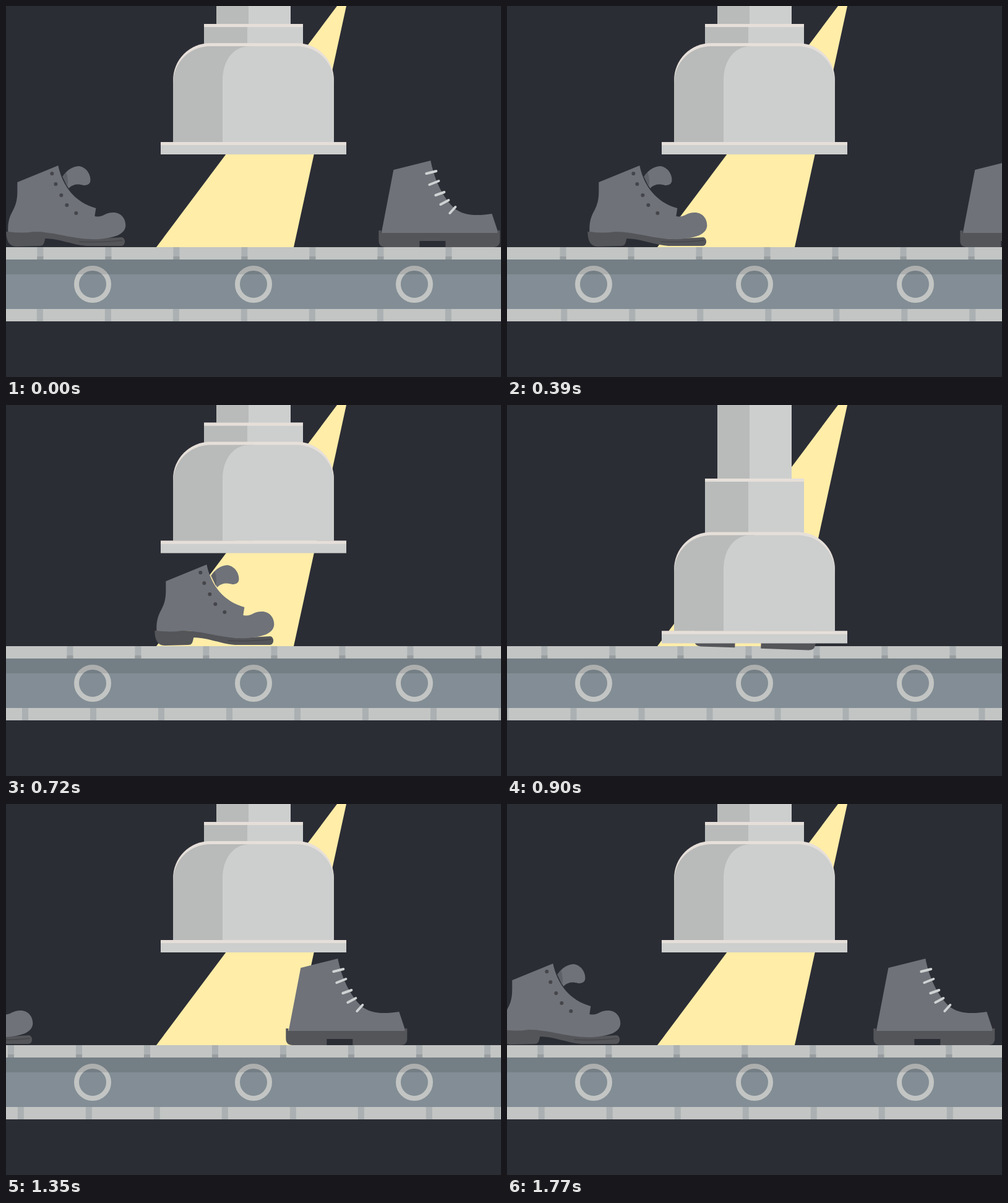
Recreate the animation shown at these times as an HTML page. Size 800 px wide and 600 px high, loop 1800 ms.

```html
<!DOCTYPE html>
<html lang="en">
<head>
<meta charset="utf-8">
<title>Shoe press</title>
<style>
  html, body { margin: 0; width: 100%; height: 100%; overflow: hidden; background: #2b2d35; }
  svg { display: block; width: 100%; height: 100%; }
  .upper { fill: #6f7279; }
  .sole { fill: #545559; }
  .light { fill: #cdcfce; }
  .dim { fill: #b9bbba; }
  .rim { fill: #e6dfd9; }
  .belt { fill: #c2c5c3; }
  .notch { fill: #abb0b2; }
</style>
</head>
<body>
<svg viewBox="0 0 800 600">
  <rect width="800" height="600" fill="#2b2d35"/>
  <path d="M535 0H550L465 390H243Z" fill="#ffeda8"/>

  <rect y="410" width="800" height="80" fill="#828d95"/>
  <g id="rollers" fill="none" stroke="#c2c5c3" stroke-width="8"></g>
  <rect y="410" width="800" height="24" fill="#000" opacity=".11"/>
  <rect class="belt" y="390" width="800" height="20"/>
  <g id="topNotches"></g>
  <rect class="belt" y="490" width="800" height="20"/>
  <g id="bottomNotches"></g>

  <g id="shoes">
    <g id="wornShoe">
      <path class="upper" d="M91 276C99 264 109 259 118 259C130 261 137 273 136 283C135 289 130 290 125 290C117 288 109 287 101 295Z"/>
      <path d="M91 276L97 269Q101 280 99 293Z" fill="#5f6168"/>
      <path class="sole" d="M0 365H50C80 365 105 374 135 377L187 374C194 376 193 388 186 388L130 388C105 386 90 377 63 376C61 384 61 388 54 388L16 389C5 389 0 380 0 365Z"/>
      <path d="M118 381Q150 383 188 379" fill="none" stroke="#48494d" stroke-width="2"/>
      <path class="upper" d="M18 285L84 258C91 292 112 318 145 327L143 340C157 343 158 334 173 334C186 334 193 344 193 355C192 370 174 375 150 377C110 379 80 365 45 365Q25 368 3 365C2 330 18 334 18 300Z"/>
      <g id="eyelets" fill="#45464b"></g>
    </g>
    <g id="newShoe">
      <path class="upper" d="M626 265L686 250C692 282 706 309 723 326C740 341 764 339 785 336L796 369H606Z"/>
      <path class="sole" d="M602 363H606V367H794V363H798V379Q798 390 787 390H710V380H668V390H613Q602 390 602 379Z"/>
      <path d="M679 271L695 267M684 289L699 283M694 306L708 301M702 321L715 314M717 335L726 325" stroke="#cfd2d2" stroke-width="4" stroke-linecap="round"/>
    </g>
    <circle id="shine" cx="692" cy="285" fill="none" stroke="#e6e6e6"/>
  </g>

  <g id="piston">
    <rect class="dim" x="340" y="-200" width="52" height="230"/>
    <rect class="light" x="392" y="-200" width="68" height="230"/>
    <rect class="dim" x="320" y="29" width="70" height="100"/>
    <rect class="light" x="390" y="29" width="90" height="100"/>
    <rect class="rim" x="320" y="29" width="160" height="5"/>
  </g>
  <g id="head">
    <path class="rim" d="M270 120A60 60 0 0 1 330 60H470A60 60 0 0 1 530 120V220H270Z"/>
    <path class="dim" d="M270 125A60 60 0 0 1 330 65H400V220H270Z"/>
    <path class="light" d="M350 220V120C350 90 366 65 394 65H470A60 60 0 0 1 530 125V220Z"/>
    <rect class="light" x="250" y="220" width="300" height="20"/>
    <rect class="rim" x="250" y="220" width="300" height="5"/>
  </g>
</svg>
<script>
const LOOP = 1800, SWAP = 885, PITCH = 110;
const SHOE_SPEED = 1 / 3, TOP_SPEED = 0.3723, BOTTOM_SPEED = -0.1859;
const $ = id => document.getElementById(id);

const easeIn = k => k * k;
const easeOut = k => 1 - (1 - k) ** 2;
const easeBoth = k => (1 - Math.cos(Math.PI * k)) / 2;
const move = (id, x, y) => $(id).setAttribute('transform', `translate(${x} ${y})`);

// Each key is [time, value, easing towards it].
function track(keys, t) {
  if (t <= keys[0][0]) return keys[0][1];
  for (let i = 1; i < keys.length; i++) {
    const [t0, v0] = keys[i - 1], [t1, v1, ease] = keys[i];
    if (t < t1) return v0 + (v1 - v0) * ease((t - t0) / (t1 - t0));
  }
  return keys[keys.length - 1][1];
}

const pressKeys = depth => [[720, 0], [810, -20, easeOut], [900, depth, easeIn], [1080, 0, easeBoth]];
const pistonKeys = pressKeys(90);
const headKeys = pressKeys(145.5);
const tiltKeys = [[900, 2], [1080, -8, easeBoth], [1200, 0, easeBoth]];

const circles = (points, r) => points.map(([x, y]) => `<circle cx="${x}" cy="${y}" r="${r}"/>`).join('');
$('rollers').innerHTML = circles([[140, 450], [400, 450], [660, 450]], 26);
$('eyelets').innerHTML = circles([[74, 271], [80, 288], [89, 306], [98, 322], [113, 335]], 3);

function notches(y, shaded) {
  let out = '';
  for (let x = 50 - PITCH; x < 800; x += PITCH) {
    out += `<rect class="notch" x="${x}" y="${y}" width="10" height="20"/>`;
    if (shaded) out += `<rect x="${x}" y="${y + 15}" width="10" height="5" fill="#989da0"/>`;
  }
  return out;
}
$('topNotches').innerHTML = notches(390, true);
$('bottomNotches').innerHTML = notches(490, false);

const wrap = x => ((x % PITCH) + PITCH) % PITCH;

function draw(t) {
  move('topNotches', wrap(t * TOP_SPEED), 0);
  move('bottomNotches', wrap(t * BOTTOM_SPEED), 0);
  move('shoes', t * SHOE_SPEED - (t < SWAP ? 0 : 600), 0);
  move('piston', 0, track(pistonKeys, t));
  move('head', 0, track(headKeys, t));

  const tilt = t < SWAP ? 0 : track(tiltKeys, t);
  $('newShoe').setAttribute('transform', `rotate(${tilt} 602 390)`);

  const k = (t - 1620) / 150, visible = k > 0 && k < 1;
  const shine = $('shine');
  shine.setAttribute('visibility', visible ? 'visible' : 'hidden');
  if (visible) {
    shine.setAttribute('r', 60 * (1 - (1 - k) ** 4));
    shine.setAttribute('stroke-width', 20 * (1 - k));
  }
}

const start = performance.now();
function tick() {
  draw((performance.now() - start) % LOOP);
  requestAnimationFrame(tick);
}
tick();
</script>
</body>
</html>
```
